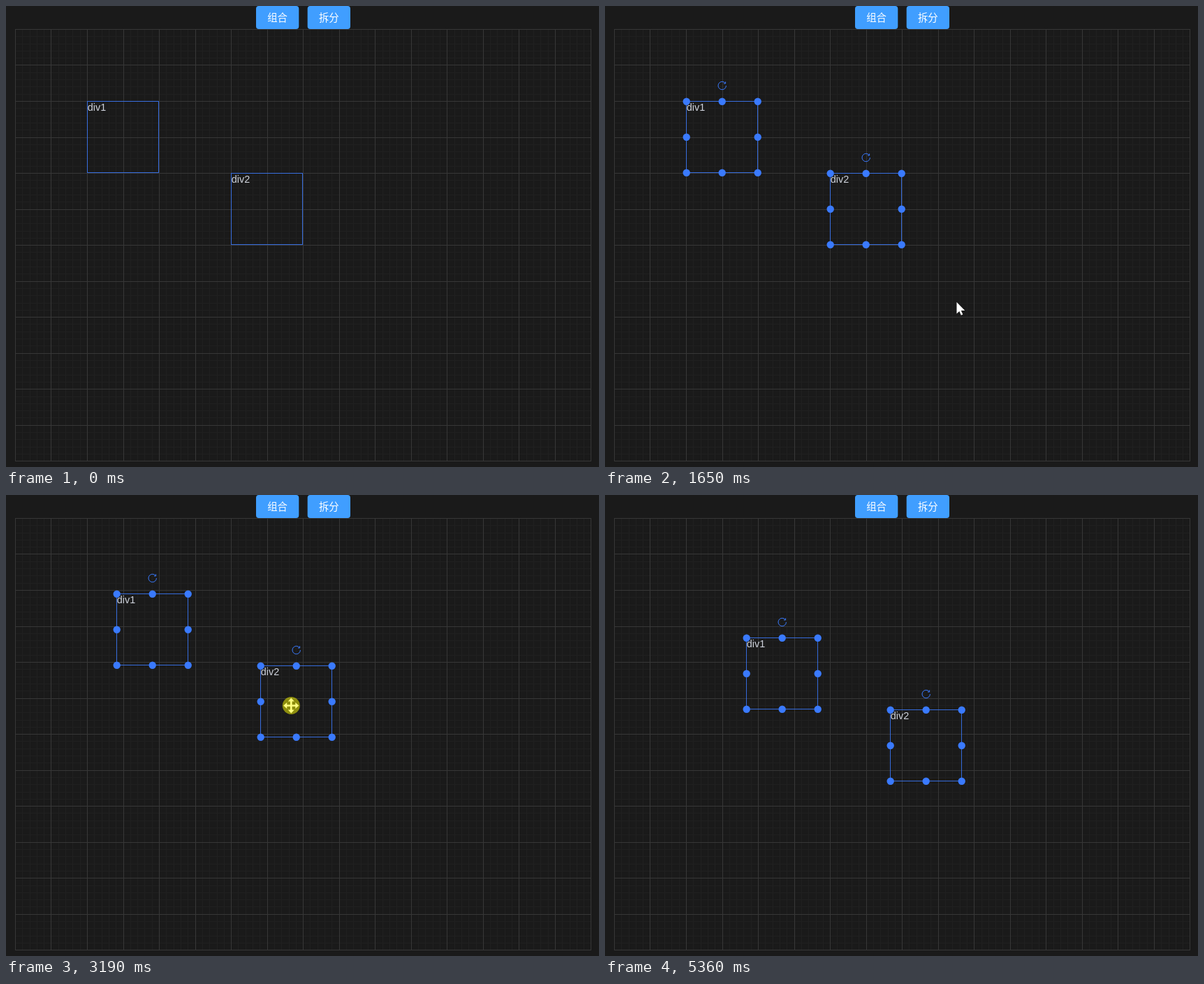
Recreate the animation shown at these times as an HTML page with a canvas. Size 849 by 660 pixels, loop 5750 ms.

```html
<!DOCTYPE html>
<html lang="zh">
<head>
<meta charset="utf-8">
<style>
  html, body { margin: 0; height: 100%; overflow: hidden; background: #1a1a1a; }
  canvas { display: block; }
</style>
</head>
<body>
<canvas id="stage" width="849" height="660"></canvas>
<script>
const ctx = document.getElementById('stage').getContext('2d');
const LOOP = 5750, STEP = 70, START = 190, GONE = 74;
const BLUE = '#3a7afe', PRIMARY = '#409eff', BOX = 103;

// Pointer strokes: key points [step, x, y], at rest at both ends
const select = [[11, 73, 96], [16, 347, 328], [17, 406, 367], [20, 507, 428]];
const circle = [[29, 365.5, 296], [35, 483, 322], [37, 481, 366], [39, 415, 380],
  [41, 371, 310], [42.5, 395, 293], [45, 454, 344]];
const swing = [[55, 249.5, 235], [57, 300, 199], [59, 326, 225], [62, 273, 272], [64, 247, 255]];
const enter = [[0, 668, 595], [9, 73, 96]];
const toBox2 = [[20, 507, 428], [27, 400, 314], [29, 365.5, 296]];
const toBox1 = [[46, 454, 344], [51, 303, 273], [54, 249.5, 235]];
const leave = [[65, 247, 255], [71, 747, 602], [73, 796, 643]];
const strokes = [enter, select, toBox2, circle, toBox1, swing, leave];
const drags = [circle, swing];

const clamp = (v, lo, hi) => Math.max(lo, Math.min(hi, v));
const held = (k, stroke) => k >= stroke[0][0] && k <= stroke.at(-1)[0];

// Smooth curve through the key points of a stroke
function along(stroke, k) {
  const t = clamp(k, stroke[0][0], stroke.at(-1)[0]);
  const i = Math.max(1, stroke.findIndex(p => p[0] >= t));
  const a = stroke[i - 1], b = stroke[i], before = stroke[i - 2], after = stroke[i + 1];
  const span = b[0] - a[0], u = (t - a[0]) / span, v = 1 - u;
  return [1, 2].map(c => {
    const startSpeed = before ? (b[c] - before[c]) / (b[0] - before[0]) : 0;
    const endSpeed = after ? (after[c] - a[c]) / (after[0] - a[0]) : 0;
    return a[c] + (b[c] - a[c]) * u * u * (3 - 2 * u) + span * u * v * (startSpeed * v - endSpeed * u);
  });
}

const pointer = k => along(strokes.findLast(s => s[0][0] <= k) || enter, k);

function groupOffset(k) {
  let dx = 0, dy = 0;
  for (const drag of drags) {
    const [x, y] = along(drag, k);
    dx += x - drag[0][1];
    dy += y - drag[0][2];
  }
  return [Math.round(dx), Math.round(dy)];
}

function gridLines(pitch, cols, rows, color) {
  ctx.fillStyle = color;
  for (let i = 0; i <= cols; i++) ctx.fillRect(Math.round(12.95 + i * pitch), 33, 1, 619);
  for (let i = 0; i <= rows; i++) ctx.fillRect(13, Math.round(32.95 + i * pitch), 825, 1);
}

function label(text, x, y, color, align, font) {
  ctx.fillStyle = color;
  ctx.textAlign = align;
  ctx.font = '14.43px ' + font;
  ctx.fillText(text, x, y);
}

function button(text, x) {
  ctx.fillStyle = PRIMARY;
  ctx.beginPath();
  ctx.roundRect(x, 0, 61.3, 33, 4);
  ctx.fill();
  label(text, x + 30.6, 22, '#fff', 'center', '"Noto Sans CJK SC", "Noto Sans CJK", sans-serif');
}

function dot(x, y, r, color) {
  ctx.fillStyle = color;
  ctx.beginPath();
  ctx.arc(x, y, r, 0, 7);
  ctx.fill();
}

function polygon(points) {
  ctx.beginPath();
  points.forEach(([x, y]) => ctx.lineTo(x, y));
  ctx.closePath();
  ctx.fill();
}

function rotateIcon(x, y) {
  ctx.save();
  ctx.translate(x, y);
  ctx.beginPath();
  ctx.arc(0, 0, 5.7, 0, -0.75);
  ctx.moveTo(4.9, -5.6);
  ctx.lineTo(4.9, -3);
  ctx.lineTo(2.3, -3);
  ctx.stroke();
  ctx.restore();
}

function box(text, x, y, selected) {
  ctx.strokeStyle = BLUE;
  ctx.lineWidth = 1;
  ctx.globalAlpha = 0.85;
  ctx.strokeRect(x + 0.5, y + 0.5, BOX - 1, BOX - 1);
  ctx.globalAlpha = 1;
  label(text, x + 0.7, y + 14, '#cfd3dc', 'left', '"Liberation Sans", Arial, sans-serif');
  if (!selected) return;
  for (let i = 0; i < 9; i++) {
    if (i !== 4) dot(x + 0.7 + (i % 3) * 51, y + 0.7 + Math.floor(i / 3) * 51, 5.2, BLUE);
  }
  rotateIcon(x + 51.7, y - 22);
}

function cursor(x, y, moving) {
  ctx.save();
  ctx.translate(x, y);
  ctx.fillStyle = '#fff';
  if (moving) {
    for (let i = 0; i < 4; i++) {
      polygon([[-1.3, 0], [-1.3, -6], [-4.5, -6], [0, -11], [4.5, -6], [1.3, -6], [1.3, 0]]);
      ctx.rotate(Math.PI / 2);
    }
  } else {
    polygon([[0, 0], [0, 16.5], [3.8, 13], [6.4, 18.7], [8.8, 17.6], [6.3, 12], [11.7, 12]]);
  }
  ctx.restore();
}

function selection(x, y, w, h) {
  ctx.fillStyle = 'rgba(64, 158, 255, 0.1)';
  ctx.fillRect(x, y, w, h);
  ctx.strokeStyle = PRIMARY;
  ctx.globalAlpha = 0.8;
  ctx.setLineDash([2, 2]);
  ctx.strokeRect(x + 0.5, y + 0.5, w - 1, h - 1);
  ctx.setLineDash([]);
  ctx.globalAlpha = 1;
}

function draw(time) {
  const k = Math.floor((time - START + Math.min(20, time / 137)) / STEP);
  const [x, y] = pointer(k), [dx, dy] = groupOffset(k);
  // The selection trails the pointer by one step
  const [, sx, sy] = select[0], [ex, ey] = along(select, k - 1);

  ctx.fillStyle = '#1a1a1a';
  ctx.fillRect(0, 0, 849, 660);
  gridLines(10.306, 80, 60, '#202020');
  gridLines(51.53, 16, 12, '#373737');
  button('组合', 358);
  button('拆分', 431.7);

  let over = false;
  [[116, 136], [322, 239]].forEach(([left, top], i) => {
    const bx = left + dx, by = top + dy;
    box('div' + (i + 1), bx, by, ex >= left + BOX && ey >= top + BOX);
    over ||= x >= bx && x <= bx + BOX && y >= by && y <= by + BOX;
  });

  const selecting = held(k, select);
  if (selecting && ex > sx) selection(sx, sy, Math.round(ex - sx) + 1, Math.round(ey - sy) + 1);

  if (k < 0 || k >= GONE) return;
  cursor(x + 0.5, y + 0.5, over && !selecting);
  if (selecting || drags.some(d => held(k, d))) dot(x + 0.5, y + 0.5, 12.5, 'rgba(255, 255, 0, 0.5)');
}

function tick() {
  draw(performance.now() % LOOP);
  requestAnimationFrame(tick);
}
tick();
</script>
</body>
</html>
```
